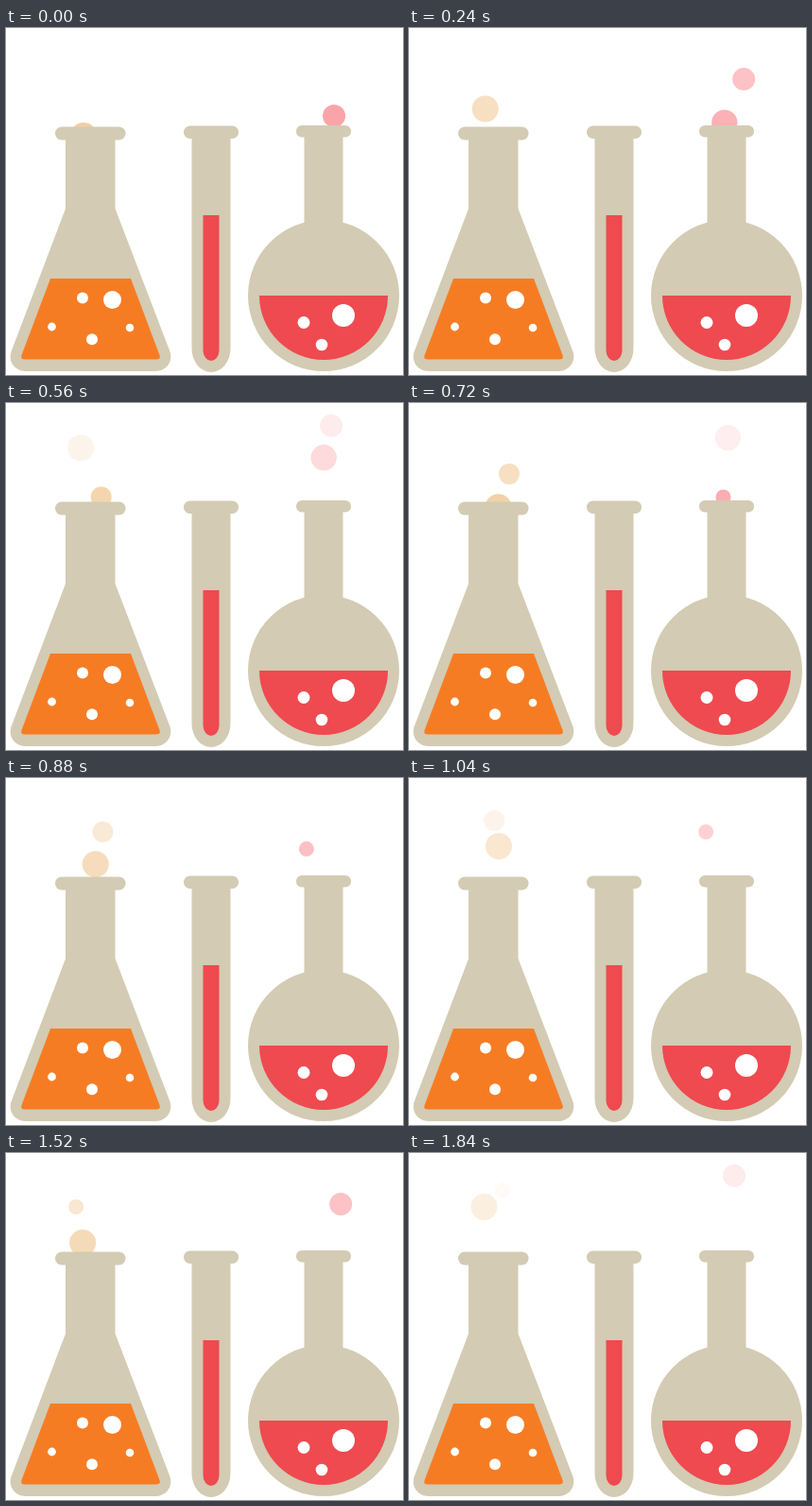
An HTML page that plays this animation: 420 px wide and 367 px high, repeating every 1920 ms.

```html
<!DOCTYPE html>
<html lang="en">
<head>
<meta charset="utf-8">
<title>Bubbling flasks</title>
<style>
html, body { margin: 0; width: 100%; height: 100%; overflow: hidden; background: #fff; }
svg { display: block; width: 420px; height: 367px; }
.glass { fill: #d3cbb3; }
.orange { fill: #f67c24; }
.red { fill: #ee4a4f; }
.hole { fill: #fff; }
</style>
</head>
<body>
<svg viewBox="0 0 420 367">
  <g id="bubbles"></g>

  <g class="glass">
    <rect x="52" y="104.5" width="74.5" height="14" rx="7"/>
    <path d="M63 110V191L6 341C1.5 352 9 363 21 363H158C170 363 177.5 352 173 341L115.5 191V110Z"/>
  </g>
  <path class="orange" d="M47 265H132L162.5 346Q164 350.5 159 350.5H20Q15 350.5 16.5 346Z"/>
  <g class="hole">
    <circle cx="81" cy="285.5" r="6"/>
    <circle cx="112.5" cy="287.5" r="9.5"/>
    <circle cx="48.5" cy="316" r="4.4"/>
    <circle cx="131" cy="317" r="4.3"/>
    <circle cx="91" cy="329.3" r="6"/>
  </g>

  <g class="glass">
    <rect x="188" y="103.5" width="58" height="13.5" rx="6.5"/>
    <path d="M196.5 110V339a20.5 25 0 0 0 41 0V110Z"/>
  </g>
  <path class="red" d="M208.5 198V341a8.5 11 0 0 0 17 0V198Z"/>

  <g class="glass">
    <rect x="307" y="103" width="58" height="12.5" rx="6"/>
    <rect x="315.5" y="108" width="41" height="110"/>
    <circle cx="336" cy="283" r="80"/>
  </g>
  <path class="red" d="M268 283a68 68 0 0 0 136 0Z"/>
  <g class="hole">
    <circle cx="315" cy="311.5" r="6.5"/>
    <circle cx="357" cy="304" r="12"/>
    <circle cx="334" cy="335" r="6.3"/>
  </g>
</svg>
<script>
const STEP = 80, STEPS = 24, MOUTH = 114;
const amber = { color: '#f1ca99', speed: 9.5 };
const pink = { color: '#fa9aa0', speed: 10.6 };

// A sway turns back at its peak; ages are counted in steps.
const quick = { peak: 3.2, life: 9 };
const slow = { peak: 4.7, life: 10 };

const layer = document.getElementById('bubbles');
const bubbles = [];

function addBubble(flask, r, born, life, place) {
  const el = document.createElementNS('http://www.w3.org/2000/svg', 'circle');
  el.setAttribute('r', r);
  el.setAttribute('fill', flask.color);
  layer.appendChild(el);
  bubbles.push({ el, born, life, place });
}

// Rises evenly with a slight lean.
function drift(flask, r, born, x, lean) {
  addBubble(flask, r, born, 9, age => [x + lean * age, MOUTH - flask.speed * age]);
}

// Slows down as it rises, and swings out to x and back.
function sway(flask, r, born, x, bend, { peak, life }, y = MOUTH) {
  addBubble(flask, r, born, life, age =>
    [x + bend * (age - peak) ** 2, y - 15.3 * age + 0.78 * age ** 2]);
}

for (const born of [0, 17]) drift(amber, 14, born, 82, -0.43);
for (const born of [0, 16]) sway(pink, 12, born, 354.2, -0.7, quick, 93);
drift(pink, 13.7, 1.7, 333, 0.6);
drift(amber, 14, 8.6, 94.5, 0.1);
sway(amber, 11, 6, 106, -1.1, quick);
sway(pink, 8, 8, 314, 1.35, slow);
sway(amber, 8, 14, 74, 1.35, slow);

function draw(step) {
  for (const { el, born, life, place } of bubbles) {
    const age = step - born;
    const [x, y] = place(age);
    el.setAttribute('cx', x);
    el.setAttribute('cy', y);
    el.setAttribute('opacity', age < 0 ? 0 : Math.max(0, 0.9 * (1 - age / life)));
  }
}

const start = performance.now();
function tick() {
  draw(Math.floor((performance.now() - start) / STEP) % STEPS);
  requestAnimationFrame(tick);
}
tick();
</script>
</body>
</html>
```
